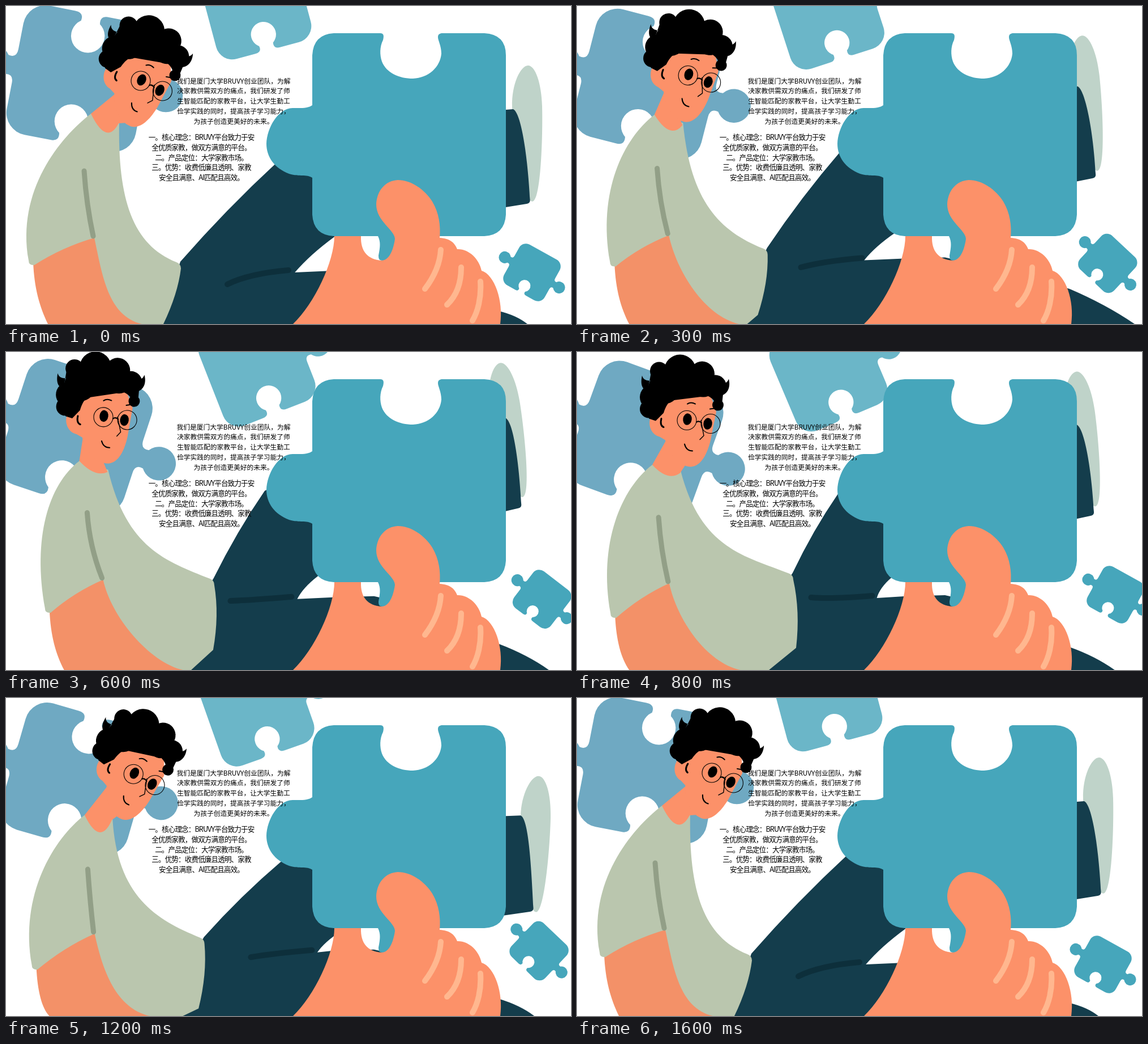
An HTML page with a canvas that plays this animation: 998 px wide and 561 px high, repeating every 1700 ms.

```html
<!DOCTYPE html>
<html lang="zh-CN">
<head>
<meta charset="utf-8">
<title>拼图</title>
<style>
html, body { margin: 0; width: 998px; height: 561px; overflow: hidden; background: #fff; }
canvas { position: absolute; left: 0; top: 0; }
p {
  position: absolute; margin: 0; width: 300px; text-align: center; white-space: nowrap;
  color: #000; font-family: "Noto Sans CJK SC", "Noto Sans", sans-serif; line-height: 17.8px;
}
#intro { left: 252px; top: 122.6px; font-size: 11.75px; }
#points { left: 195px; top: 222.1px; font-size: 12.6px; letter-spacing: -0.9px; }
</style>
</head>
<body>
<canvas id="stage" width="998" height="561"></canvas>
<p id="intro">我们是厦门大学BRUVY创业团队，为解<br>决家教供需双方的痛点，我们研发了师<br>生智能匹配的家教平台，让大学生勤工<br>俭学实践的同时，提高孩子学习能力，<br>为孩子创造更美好的未来。</p>
<p id="points">一。核心理念：BRUVY平台致力于安<br>全优质家教，做双方满意的平台。<br>二。产品定位：大学家教市场。<br>三。优势：收费低廉且透明、家教<br>安全且满意、AI匹配且高效。</p>
<script>
const ctx = document.getElementById('stage').getContext('2d');
const LOOP = 1700, STEP = 100;

const SKIN = '#fc9169', ARM = '#f39168', SHIRT = '#bac6ae', SEAM = '#929f87';
const TROUSERS = '#143d4c', CREASE = '#0d2f3b', TEAL = '#46a6bb', LEAF = '#bfd3c9';

// Every moving part follows these few curves.
const TIMES = [0, 300, 500, 800, 1000, 1200, 1600];
const CURVES = {
  back: [0, .59, 1, .62, .42, .18],
  nod: [1, .53, 0, 0, .56, 1.12],
  reach: [0, .38, .67, 1, .76, .57],
  kick: [.7, .25, 0, .1, 1, .98],
  sag: [0, .1, 0, .5, 1, .92],
  slide: [0, 1, .69, .45, .37, .19]
};

const BIG_PIECE = new Path2D('M579 48L661 48C667 48 668 52 666 60C660 72 660 86 664 98C672 118 694 128 719 128C746 127 767 108 769 84C769 70 763 61 763 55C763 50 766 48 771 48L845 48Q883 50 883 87L883 368Q881 404 845 406L690 406C688 430 681 450 667 449C660 449 658 448 658 440C661 425 662 416 657 406L579 406Q543 404 541 368L541 303C530 296 520 302 500 296C474 286 460 266 460 243C461 215 480 181 506 180C520 180 533 181 541 175L541 87Q543 50 579 48Z');
const HAND = new Path2D('M507 561C545 525 580 450 580 406L627 406C626 434 640 447 663 449C679 449 685 425 687 411C687 395 654 380 654 350C655 326 670 308 692 307C716 307 740 324 753 345C765 365 768 388 766 409C784 410 793 418 797 429C817 428 836 446 840 467C863 474 879 520 873 561Z');
const LEAF_SHAPE = new Path2D('M0 0C13 0 23 32 23 72C23 125 16 240 1 240C-14 240-30 125-30 72C-30 32-13 0 0 0Z');
const FACE = new Path2D('M106 104C96 118 102 140 119 144L129 150C133 170 150 196 174 197C192 196 203 175 209 150L219 100L205 60L130 64Z');
const HAIR = new Path2D('M88 36C85 50 86 64 105 64L112 42C98 48 90 44 88 36ZM241 42C246 60 235 76 218 70L218 46C232 53 238 50 241 42ZM98 62L104 30L150 8L200 25L232 60L228 96L219 98C220 82 212 76 204 72L140 80C132 84 128 96 126 102L112 116L100 112Z');

// Smooth cyclic interpolation: the last time repeats the first value.
function curve(values, t) {
  const n = values.length, span = TIMES[n];
  const value = i => values[(i + n) % n];
  const when = i => TIMES[(i + n) % n] + Math.floor(i / n) * span;
  let i = 0;
  while (i < n - 1 && t >= TIMES[i + 1]) i++;
  const h = when(i + 1) - when(i), s = (t - when(i)) / h;
  const a = value(i), b = value(i + 1);
  const va = (b - value(i - 1)) / (when(i + 1) - when(i - 1)) * h;
  const vb = (value(i + 2) - a) / (when(i + 2) - when(i)) * h;
  return a + s * va + s * s * (3 * (b - a) - 2 * va - vb) + s * s * s * (2 * (a - b) + va + vb);
}

function fill(path, color) {
  ctx.fillStyle = color;
  ctx.fill(typeof path === 'string' ? new Path2D(path) : path);
}

function stroke(d, width, color) {
  ctx.strokeStyle = color;
  ctx.lineWidth = width;
  ctx.stroke(new Path2D(d));
}

function oval(x, y, rx, ry, tilt = 0) {
  ctx.beginPath();
  ctx.ellipse(x, y, rx, ry, tilt, 0, 2 * Math.PI);
}

function placed(x, y, degrees, draw) {
  ctx.save();
  ctx.translate(x, y);
  ctx.rotate(degrees * Math.PI / 180);
  draw();
  ctx.restore();
}

// Sides run clockwise from the top: 1 tab, -1 notch, 0 flat.
function jigsaw(x, y, degrees, size, sides, color) {
  const neck = .61, right = Math.PI / 2;
  placed(x, y, degrees, () => {
    ctx.scale(size, size);
    ctx.beginPath();
    ctx.moveTo(-.3, -.5);
    for (const side of sides) {
      if (side) {
        ctx.lineTo(-.13, -.5);
        ctx.quadraticCurveTo(-.06, -.5, -.073, -.5 - side * .065);
        ctx.arc(0, -.5 - side * .17, .128, side * (right + neck), side * (5 * right - neck), side < 0);
        ctx.quadraticCurveTo(.06, -.5, .13, -.5);
      }
      ctx.arcTo(.5, -.5, .5, 0, .17);
      ctx.rotate(right);
    }
    ctx.closePath();
    ctx.fillStyle = color;
    ctx.fill();
  });
}

function drawBackground({ reach, kick }) {
  jigsaw(130 - 9 * reach, 128 + 25 * reach, 11 + 9 * reach, 232, [-1, 1, -1, 1], '#6fa9c2');
  jigsaw(440 + 4 * reach, -5 + 41 * reach, -15 - 8 * reach, 173, [0, 1, -1, 0], '#6bb6c8');
  jigsaw(929 + 22 * reach, 470 - 42 * reach, 29 + 15 * Math.sin(Math.PI * reach), 82, [0, 1, -1, 1], TEAL);
  placed(875 + 67 * kick, 23 + 117 * kick, -9 + 10.5 * kick, () => fill(LEAF_SHAPE, LEAF));
}

// Front lower corner of the shirt, where the thigh starts.
const shirtFront = ({ reach, sag }) => [309 + 73 * reach, 455 - 66 * reach + 9 * sag];

function drawLegs(m) {
  const { reach, kick, sag, slide } = m;
  const top = 120 + 90 * kick, cornerX = 886 + 28 * kick * kick;
  const heelX = 911 + 21 * kick, heelY = 276 + 100 * kick;
  fill(`M870 ${top}L883 ${top}L${cornerX - 4} ${top - 1}
    C${cornerX + 10} ${top + 4} ${heelX - 4} ${(top + heelY) / 2} ${heelX} ${heelY - 3}
    Q${heelX} ${heelY + 2} ${heelX - 6} ${heelY + 3}L870 ${heelY + 11}Z`, TROUSERS);

  const [sx, sy] = shirtFront(m);
  const kneeX = 458 + 30 * kick, kneeY = 246 + 42 * kick;
  const underX = 552 + 40 * kick, underY = 396 + 16 * kick;
  const shin = 467 - 40 * Math.max(0, reach) ** .6 + 8 * sag;
  const tipX = 478 + 46 * kick + 47 * reach, tipY = shin + 3;
  const right = 538 - 39 * slide, end = 921 + 64 * slide;
  fill(`M270 561L${sx - 1} ${sy - 4}Q${(sx + kneeX) / 2 - 5} ${(sy + kneeY) / 2 - 7} ${kneeX} ${kneeY}
    L560 200L640 300L${underX} ${underY}Q${(underX + tipX) / 2 - 8} ${(underY + tipY) / 2} ${tipX} ${tipY}
    L578 ${shin}L650 ${shin - 2}L760 ${shin + 23}L870 ${right}
    Q${(870 + end) / 2 + 6} ${(right + 561) / 2 - 4} ${end} 561Z`, TROUSERS);

  const creaseX = 391 + 45 * sag;
  stroke(`M${creaseX} ${shin + 24 - 22 * reach}Q${creaseX + 38} ${shin + 5} ${creaseX + 108} ${shin - 1}`, 10, CREASE);
}

function collar({ back, sag, nod }) {
  const lx = 150 - 21 * back - 8 * sag, rx = 199 - 20 * back - 9 * sag;
  return {
    lx, ly: 190 + 18 * sag, rx, ry: 207 + 4 * back + 8 * sag,
    mx: (lx + rx) / 2 + 3, my: 222 + 25 * nod + 14 * sag
  };
}

function drawBody(m) {
  const { back, nod, reach, sag } = m;
  const { lx, ly, rx, ry } = collar(m);
  const hemX = 42 + 31 * back, hemY = 458 + 24 * sag;
  const pitX = 156 + 18 * back * back, pitY = 409 - 9 * back + 9 * sag;
  const bellyX = 240 + 78 * back;
  const cornerX = 278 + 109 * reach, cornerY = 561 - 46 * reach + 14 * sag;
  const [fx, fy] = shirtFront(m);
  const bend = 15 - 17 * nod + 22 * reach;

  fill(`M${hemX + 6} ${hemY - 6}C${hemX + 8} ${hemY + 42} ${hemX + 18} ${hemY + 75} ${hemX + 34} 565
    L${bellyX + 10} 565L${pitX} ${pitY}L${pitX} ${pitY - 20}L${hemX + 20} ${hemY - 40}Z`, ARM);
  fill(`M${lx} ${ly}C${lx - 55} ${ly + 42} ${hemX - 24} ${hemY - 132} ${hemX - 2} ${hemY - 9}
    Q${hemX - 2} ${hemY} ${hemX + 8} ${hemY - 1}Q${(hemX + pitX) / 2} ${(hemY + pitY) / 2 - 8} ${pitX} ${pitY}
    C${pitX + 14} ${pitY + 65} ${bellyX - 60} 547 ${bellyX} 561L${277 + 62 * reach} 561L${cornerX} ${cornerY}
    Q${(cornerX + fx) / 2 + 10} ${(cornerY + fy) / 2} ${fx} ${fy + 8}Q${fx} ${fy} ${fx - 8} ${fy - 3}
    C${fx - 85} ${fy - 34} ${rx + bend} ${ry + 135} ${rx + 1} ${ry - 4}Z`, SHIRT);

  const seamX = 138 + 5 * back + 6 * sag, seamY = 291 - 10 * back + 14 * sag;
  stroke(`M${seamX} ${seamY}Q${seamX + 4} ${(seamY + pitY) / 2} ${pitX - 2} ${pitY - 3}`, 9, SEAM);
}

function drawHeadAndNeck(m) {
  const { back, nod, sag } = m;
  const x = 238 - 71 * back, y = 126 - 12 * back + 6 * nod + 4 * sag, degrees = 17 * nod;
  const a = degrees * Math.PI / 180;
  const joint = (u, v) => `${x + u * Math.cos(a) - v * Math.sin(a)} ${y + u * Math.sin(a) + v * Math.cos(a)}`;
  const { lx, ly, mx, my, rx, ry } = collar(m);
  fill(`M${joint(-42, 25)}L${joint(-37, 36)}L${lx} ${ly}Q${mx} ${my} ${rx} ${ry}L${joint(-2, 78)}L${joint(10, 40)}Z`, SKIN);
  placed(x, y, degrees, drawHead);
}

// Drawn around the centre of the left lens.
function drawHead() {
  ctx.translate(-167, -115);
  fill(FACE, SKIN);
  fill(HAIR, '#000');
  const curls = [[118, 28, 16], [155, 27, 28], [194, 33, 22], [217, 55, 20], [106, 74, 22],
    [100, 95, 16], [127, 58, 28], [160, 50, 25], [196, 52, 22], [222, 88, 10]];
  for (const [x, y, r] of curls) { oval(x, y, r, r); ctx.fill(); }

  ctx.strokeStyle = '#000';
  ctx.lineWidth = 1.1;
  for (const side of [0, 1]) {
    oval(168 + 36 * side, 113 + 8 * side, 7.7, 10.3, .15);
    ctx.fill();
    oval(167 + 42 * side, 115 + 6 * side, 17, 17);
    ctx.stroke();
  }
  stroke('M184 118Q188 115 193 119', 2.2, '#000');
  stroke('M192 115L197 142L190 149', 1.4, '#000');
  stroke('M163 157Q166 169 177 169M168 86Q174 82 182 86M208 95L216 94', 2, '#000');
  stroke('M122 112Q119 124 126 127', 3, '#000');
}

function draw(t) {
  const motion = {};
  for (const name in CURVES) motion[name] = curve(CURVES[name], t);
  ctx.clearRect(0, 0, 998, 561);
  ctx.lineCap = ctx.lineJoin = 'round';
  drawBackground(motion);
  drawLegs(motion);
  drawBody(motion);
  drawHeadAndNeck(motion);
  fill(BIG_PIECE, TEAL);
  fill(HAND, SKIN);
  stroke('M768 430Q766 465 740 499M804 461C804 490 795 512 779 527M838 486C840 515 833 540 824 555', 10, '#ffb78f');
}

function tick() {
  draw(Math.floor(performance.now() % LOOP / STEP) * STEP);
  requestAnimationFrame(tick);
}
tick();
</script>
</body>
</html>
```
